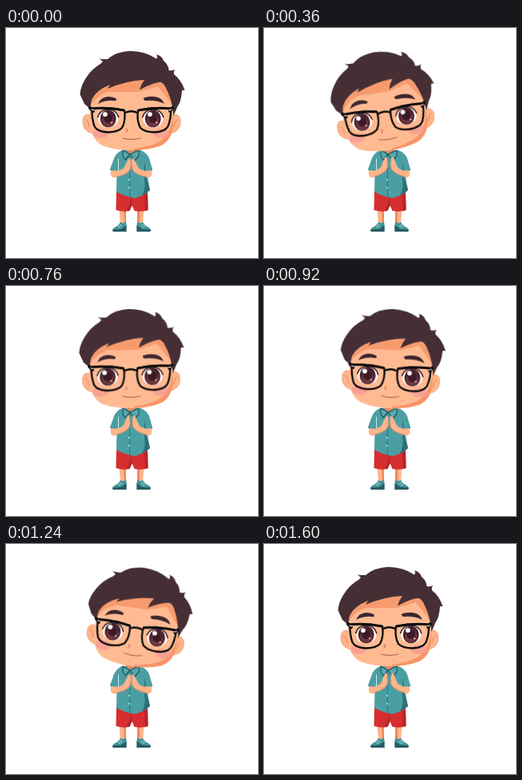
Animation, 315 px wide and 288 px high, one loop 1640 ms. Source, as an HTML page:

```html
<!DOCTYPE html>
<html lang="en">
<head>
<meta charset="utf-8">
<title>Clapping boy</title>
<style>
html, body { margin: 0; width: 100%; height: 100%; overflow: hidden; background: #fff; }
svg { display: block; width: 100vw; height: 100vh; }

/* 1600 ms of motion at 25 steps a second, then one step of rest */
.head { transform-origin: 157px 152px; animation: sway 1640ms infinite; }
.arm { transform-origin: 134px 184px; animation: clap 1640ms steps(5) infinite; }

@keyframes sway {
  0% { transform: rotate(0deg); animation-timing-function: steps(10); }
  24.39% { transform: rotate(-9deg); animation-timing-function: steps(20); }
  73.17% { transform: rotate(9deg); animation-timing-function: steps(10); }
  97.56%, 100% { transform: rotate(0deg); }
}
@keyframes clap {
  0%, 24.39%, 48.78%, 73.17%, 97.56%, 100% { transform: rotate(0deg); }
  12.195%, 36.585%, 60.975%, 85.365% { transform: rotate(-9deg); }
}
</style>
</head>
<body>
<svg viewBox="0 0 315 288" fill="none" stroke-linecap="round" stroke-linejoin="round">
  <defs>
    <clipPath id="faceClip"><use href="#face"/></clipPath>
    <g id="eye">
      <ellipse rx="12.5" ry="11" fill="#fff"/>
      <ellipse rx="10" ry="10.8" fill="#4a222d"/>
      <ellipse cy="2.5" rx="7.6" ry="7.6" fill="#70353f"/>
      <circle r="5.4" fill="#3a1a25"/>
      <circle cx="-3.8" cy="-5.4" r="2.9" fill="#fff"/>
      <circle cx="4.4" cy="4.8" r="1.1" fill="#e9c4c4"/>
      <path d="M-13-2Q-10-11.500 0-11.500Q10-11.500 13-2" stroke="#33202a" stroke-width="1.600"/>
    </g>
    <g id="arm">
      <g class="arm">
        <path d="M131.500 181Q131 187 135 187Q145 186 152 181.500Q156 179 156.300 174L156.500 166Q155.500 162 153.500 165L150.500 170Q149 174 146 177L137 180Z" fill="#ffb48a"/>
        <path d="M134 187Q146 185 152 181.500Q156 179 156.300 173" stroke="#e8825c" stroke-width=".8"/>
      </g>
      <path d="M131.500 178Q130 183 131.500 185.500Q134 188 138 186L140 179Z" fill="#ffb48a"/>
    </g>
    <g id="shoe">
      <path d="M143 243Q147 246 150 242Q151 248 150.500 255H134Q132 252 136 249.500Q141 247 143 243Z" fill="#3f9598"/>
      <path d="M133.500 252Q140 253 145 251L150.500 247V255H134Q132.500 254 133.500 252Z" fill="#275a62"/>
      <path d="M140 248L143 250M142 246L145 248" stroke="#d8ecea" stroke-width=".8"/>
    </g>
  </defs>

  <g id="legs">
    <path d="M141.500 226H150V247H143ZM164 226H172.500L171 247H164Z" fill="#ffb48a"/>
    <path d="M147 229H150V246H148ZM164 229H167V246H164Z" fill="#f0885f"/>
    <use href="#shoe"/>
    <use href="#shoe" transform="matrix(-1 0 0 1 314 0)"/>
    <path d="M138 203H177L177.500 228Q171 231 160.500 229L157.500 222L154.500 229Q146 231 137.500 228Z" fill="#d62e2f"/>
    <path d="M157 211L157.500 222L154.500 229L151 229Q155 220 157 211ZM173 208H177L177.500 228L174 229Z" fill="#b3262c"/>
  </g>

  <g id="shirt">
    <path d="M145 153Q138 156 135 163L130 177Q133 180.500 138.500 181L138 205Q148 211 161 213Q172 210 180 203L176 181Q181 180 183 177L179 163Q176 156 168 153Z" fill="#4a9fa3"/>
    <path d="M173 168Q175 174 174 182L180 203Q176 207 170 210Q175 200 173 190Z" fill="#2f6f77"/>
    <path d="M140.500 164V181" stroke="#d3ebe8" stroke-width="1"/>
    <path d="M154.500 160V212" stroke="#2f777d" stroke-width="1"/>
    <path d="M131 177.500Q135 180 139 180.500M176 180.500Q180 180 182.500 177.500" stroke="#347e84" stroke-width="1.200"/>
    <path d="M148 151H165L155.500 158Z" fill="#e98b61"/>
    <path d="M146 153L146 160L149 165L155 158ZM166 153L166 160L161 166L155 158Z" fill="#54a9ac" stroke="#22545c" stroke-width="1.200"/>
    <g fill="#d9eeea"><circle cx="154" cy="190" r="1"/><circle cx="154" cy="200" r="1"/></g>
  </g>

  <use href="#arm"/>
  <use href="#arm" transform="matrix(-1 0 0 1 313 0)"/>

  <g class="head">
    <g fill="#ffb48a" stroke="#f0966d" stroke-width=".8">
      <path d="M107 110Q98 105 96 115Q95 129 108 132Z"/>
      <path d="M206 110Q216 105 218 115Q219 129 206 132Z"/>
    </g>
    <path d="M104 124Q103 115 99 115M210 124Q211 115 215 115" stroke="#ee8f64" stroke-width="1.200"/>
    <path id="face" d="M104 62H209V118Q209 139 194 147Q178 153 157 153Q135 153 120 147Q106 139 105 118Z" fill="#ffba92"/>
    <g clip-path="url(#faceClip)">
      <path d="M209 104Q208 133 190 143Q177 149 160 151V155H212V104Z" fill="#f89465"/>
      <path d="M104 103Q108 87 128 80L167 80L190 73L210 99V60H104Z" fill="#f79b6e"/>
      <ellipse cx="118" cy="132" rx="10" ry="6" fill="#f79c93" opacity=".8"/>
      <ellipse cx="194" cy="132" rx="10" ry="6" fill="#f79c93" opacity=".8"/>
    </g>

    <path d="M105 101L98 95L92.500 83Q93 74 99 64Q107 51 118 45L121 42Q119 39 116 38.500Q122 39 127 39Q138 29.500 155 28.800Q174 29 188 38.500Q190 36 188 33Q195 35 197 41Q203 46 203.500 53Q207 54 211 52Q209 55 210 58Q219 65 223.500 78L220 78Q219 93 214 99L209.500 110Q208 90 199 73Q195 67 191 68Q180 70 167 77.500Q169 70 173 65Q150 66 127 76Q129 73 130 71Q112 78 107 90Z" fill="#452f35"/>

    <path d="M115 95Q118 87 127 86Q134 85.500 138 88.500Q138 92 135 91Q125 90 115 95ZM198 95Q195 87 186 86Q178 85 172 87.500Q172 91 175 91Q188 90 198 95Z" fill="#3d272d"/>

    <use href="#eye" x="127.700" y="113.500"/>
    <use href="#eye" x="183.700" y="113.500"/>

    <path d="M150 126Q153 128 150 130" stroke="#c96d50" stroke-width="1.100"/>
    <path d="M146 138Q157 141 168 138" stroke="#a95b4b" stroke-width="1"/>

    <g stroke="#0c0b0d" stroke-width="2.300">
      <path d="M107.500 101Q128 98.500 148 103Q150 116 145 125Q140 130.500 127 130.500Q114 130 110.500 123Q107 113 107.500 101Z"/>
      <path d="M206 101Q185 98.500 165 103Q163 116 168 125Q173 130.500 186 130.500Q199 130 202.500 123Q206.500 113 206 101Z"/>
      <path d="M149 106Q156.500 102.500 164 106"/>
      <path d="M106 101Q128 99 147 103M207 101Q185 99 166 103" stroke-width="3"/>
      <path d="M105 100L109 104M208 100L205 104" stroke-width="4"/>
    </g>
    <path d="M107 102L110 103M207 102L204 103" stroke="#fff" stroke-width="1.200"/>
  </g>
</svg>
</body>
</html>
```
